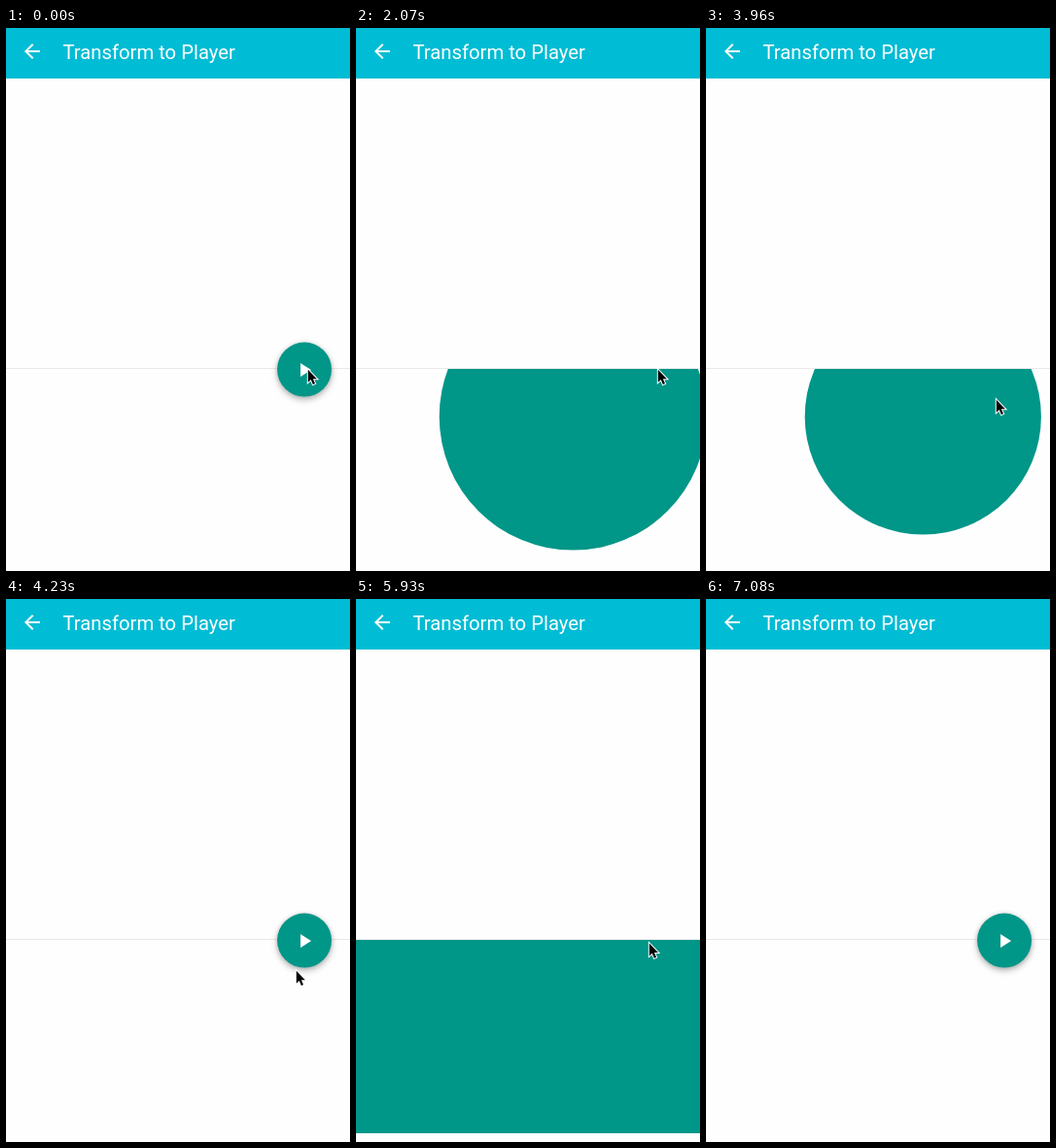
These frames come from a looping animation (354 px wide and 559 px high, 7.52 s). An HTML page:

```html
<!DOCTYPE html>
<html lang="en">
<head>
<meta charset="utf-8">
<title>Transform to Player</title>
<style>
  html, body { margin: 0; width: 100%; height: 100%; overflow: hidden; background: #fefefe; }
  svg { display: block; }
  .title { font: 400 20.25px Roboto, "Open Sans", sans-serif; fill: #fff; }
  .disc { filter: drop-shadow(0 0 2px rgba(0, 0, 0, .12)) drop-shadow(0 3px 3px rgba(0, 0, 0, .28)); }
</style>
</head>
<body>
<svg width="354" height="559" viewBox="0 0 354 559">
  <rect width="354" height="559" fill="#fefefe"/>
  <rect width="354" height="52" fill="#00bcd4"/>
  <path transform="translate(15 12)" fill="#fff"
    d="M20 11H7.83l5.59-5.59L12 4l-8 8 8 8 1.41-1.41L7.83 13H20z"/>
  <text class="title" x="58.5" y="31.5">Transform to Player</text>
  <rect y="350" width="354" height="1" fill="#e8e8e8"/>
  <svg y="351" width="354" height="199" overflow="hidden">
    <circle id="panel" cx="223.3" cy="49" fill="#009688"/>
  </svg>
  <g id="fab">
    <circle class="disc" r="28" fill="#009688"/>
    <path transform="translate(-12 -11.5)" d="M8 5v14l11-7z" fill="#fff"/>
  </g>
  <path id="cursor" d="M1.8 1.8V14.8L4.8 12 6.9 16.9 9 16 6.9 11.2H10.9Z"
    fill="#000" stroke="#fff" stroke-width="2" paint-order="stroke"/>
</svg>
<script>
const LOOP = 7520, STEP = 90;
const FLY = 236, GROW = 320, SHRINK = 250, BACK = 180;
const FAB_R = 28, FULL_R = 354;
const ARC = { x: 289.5, y: 417, r: 67.8, from: -75, sweep: -90 };

// Each open/close cycle; pace stretches its durations
const runs = [
  { open: 1708, close: 3800, pace: 1 },
  { open: 4947, close: 6480, pace: 1.25 }
];

// Pointer moves, each one added to the place before
const rest = { x: 309, y: 350 };
const moves = [
  { at: 2340, ms: 360, dx: 0, dy: -24 },
  { at: 3420, ms: 360, dx: -12, dy: 55 },
  { at: 4410, ms: 260, dx: 4, dy: -29 },
  { at: 5880, ms: 400, dx: -63, dy: 49 },
  { at: 6730, ms: 350, dx: 14, dy: 159 }
];

const [panel, fab, cursor] = ['panel', 'fab', 'cursor'].map(id => document.getElementById(id));
const span = (t, start, length) => Math.min(1, Math.max(0, (t - start) / length));
const ease = p => (1 - Math.cos(Math.PI * p)) / 2;
const place = (el, x, y) => el.setAttribute('transform', `translate(${x.toFixed(2)} ${y.toFixed(2)})`);
const show = (el, on) => el.setAttribute('visibility', on ? 'visible' : 'hidden');

function tick(t) {
  const base = [7080, 6010, 4670, 0].find(b => t >= b);
  return base + Math.floor((t - base) / STEP) * STEP;
}

function pointer(t) {
  return moves.reduce(({ x, y }, m) => {
    const p = span(t, m.at, m.ms) ** 2;
    return { x: x + m.dx * p, y: y + m.dy * p };
  }, rest);
}

// How far the button has flown and the panel has spread, both 0 to 1
function progress(t, { open, close, pace }) {
  return t < close
    ? [span(t, open, FLY * pace), span(t, open + FLY * pace, GROW * pace)]
    : [1 - span(t, close + SHRINK * pace, BACK * pace), 1 - span(t, close, SHRINK * pace)];
}

function draw(now) {
  const t = tick(now % LOOP);
  const [fly, spread] = progress(t, runs[t < 4500 ? 0 : 1]);

  const a = (ARC.from + ARC.sweep * ease(fly)) * Math.PI / 180;
  place(fab, ARC.x + ARC.r * Math.cos(a), ARC.y + ARC.r * Math.sin(a));
  show(fab, spread === 0);
  panel.setAttribute('r', FAB_R + (FULL_R - FAB_R) * ease(spread));
  show(panel, spread > 0);

  const { x, y } = pointer(t);
  place(cursor, x, y);
}

function loop(now) {
  draw(now);
  requestAnimationFrame(loop);
}
draw(0);
requestAnimationFrame(loop);
</script>
</body>
</html>
```
